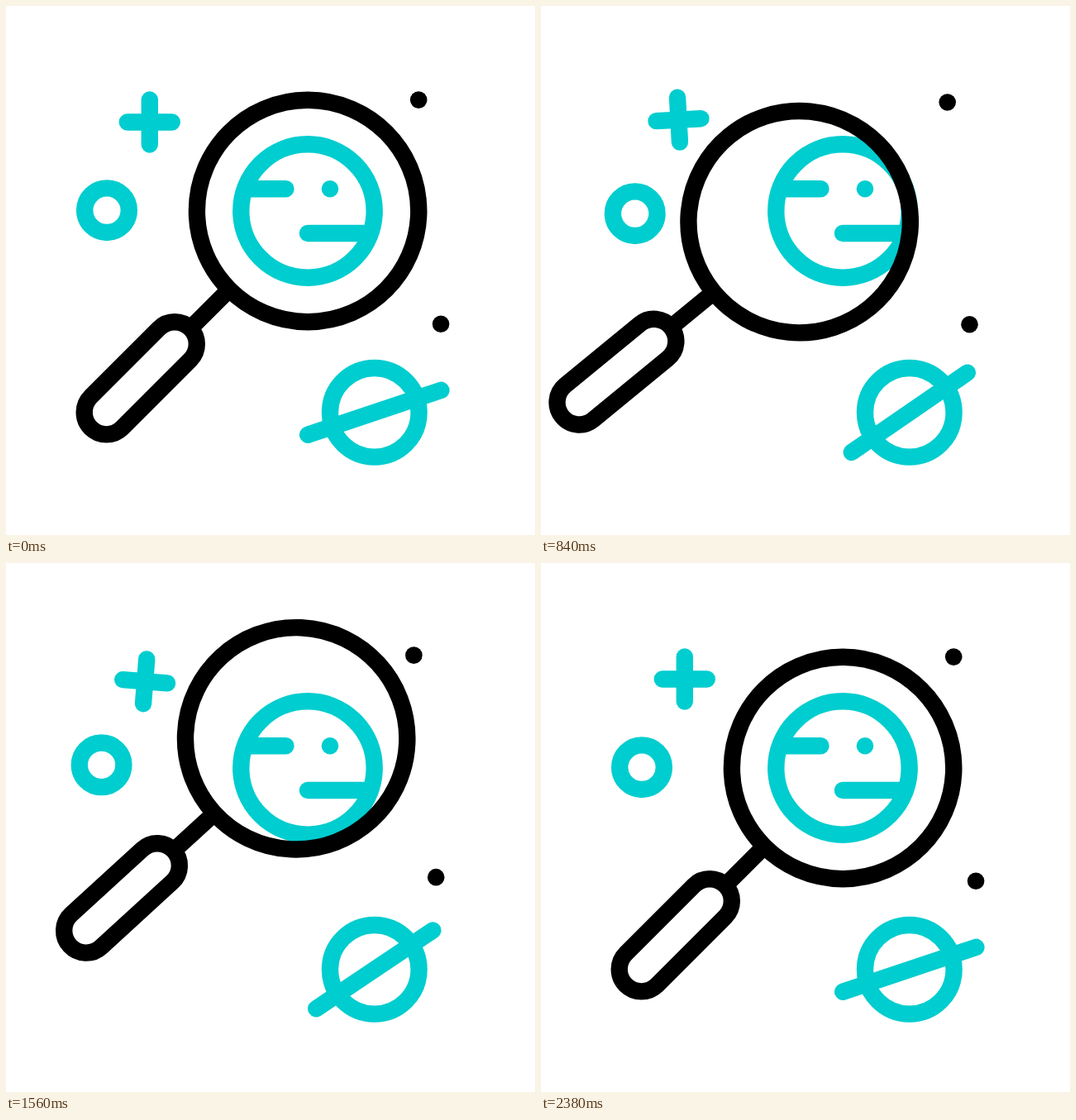
An HTML page for the animation above (2.4 s loop, 640x640 px).

```html
<!DOCTYPE html>
<html lang="en">
<head>
<meta charset="utf-8">
<title>Space search</title>
<style>
html, body { margin: 0; width: 100%; height: 100%; overflow: hidden; background: #fff; }
svg { display: block; width: 100vw; height: 100vh; fill: none; stroke-width: 20.4; stroke-linecap: round; }
.cyan { stroke: #00cdcf; }
.black { stroke: #000; }
.dot { stroke: none; }
.cyan .dot { fill: #00cdcf; }
.black.dot { fill: #000; }
</style>
</head>
<body>
<svg viewBox="0 0 640 640">
  <g class="cyan">
    <circle cx="365" cy="248" r="80.7"/>
    <path d="M290 221.2H338.5M365 275H438"/>
    <circle class="dot" cx="392" cy="221.2" r="10.3"/>
    <circle cx="445.8" cy="491.8" r="53.8"/>
    <path id="orbit" d="M-85 0H85"/>
    <circle id="moon" r="26.8"/>
    <path id="plus" d="M-27 0H27M0-27V27"/>
  </g>
  <circle id="starA" class="black dot" r="10.3"/>
  <circle id="starB" class="black dot" r="10.3"/>
  <g id="lens" class="black">
    <circle r="134.2"/>
    <path d="M0 134V201" stroke-linecap="butt"/>
    <rect x="-26.8" y="201" width="53.6" height="170.3" rx="26.8"/>
  </g>
</svg>
<script>
const LOOP = 2400, STEP = 20, MOVE = LOOP - STEP;
const { PI, sin, cos, min, max, floor } = Math;

// Angle around the loop, slightly ahead of time in the middle
const phase = u => 2 * PI * u + .25 * sin(PI * u);

// Lopsided, optionally slanted ellipse that starts at its right end
const drift = (width, first, second, slant = 0, turn = 0) => u => {
  const a = phase(u), s = sin(a);
  const x = -width / 2 * (1 - cos(a));
  return [x, s * (s > 0 ? first : second) - slant * x * -1, turn * s];
};

// Smooth path through evenly timed [x, y, turn] points, from rest pose to rest pose
const path = (...keys) => {
  const pts = [[0, 0, 0], ...keys, [0, 0, 0]], n = pts.length - 1;
  const at = i => pts[max(0, min(n, i))];
  return u => {
    const i = min(n - 1, floor(u * n)), f = u * n - i, g = 1 - f;
    return pts[i].map((p, k) => {
      const q = at(i + 1)[k];
      const m = (q - at(i - 1)[k]) / 2, e = (at(i + 2)[k] - p) / 2;
      return p + (q - p) * f * f * (3 - 2 * f) + f * g * (m * g - e * f);
    });
  };
};

const swing = u => [0, 0, -22.5 * min(u / .496, (1 - u) / .504)];

const part = (id, x, y, angle, move) => {
  const el = document.getElementById(id);
  return u => {
    const [dx, dy, turn] = move(u);
    el.setAttribute('transform', `translate(${x + dx} ${y + dy}) rotate(${angle + turn})`);
  };
};

const parts = [
  part('lens', 365.1, 248, 45, path(
    [-19, 48, 5.6], [-51, 18.5, 5.75], [-48, -33, 4.05], [-12, -35, 2.45], [4.5, -12.5, 1.1])),
  part('orbit', 445.8, 491.8, -18.5, swing),
  part('moon', 122, 247.2, 0, drift(9.4, 6.2, 3.1)),
  part('plus', 173.8, 140.5, 0, drift(8.3, -4.4, -3, 0, -4.8)),
  part('starA', 499.2, 113.6, 0, drift(8.5, 4.4, 2.1)),
  part('starB', 526.1, 384.8, 0, drift(8.6, 3.5, 3.5, .235))
];

const start = performance.now();
function draw() {
  const t = floor((performance.now() - start) % LOOP / STEP) * STEP;
  parts.forEach(place => place(t / MOVE));
  requestAnimationFrame(draw);
}
draw();
</script>
</body>
</html>
```
